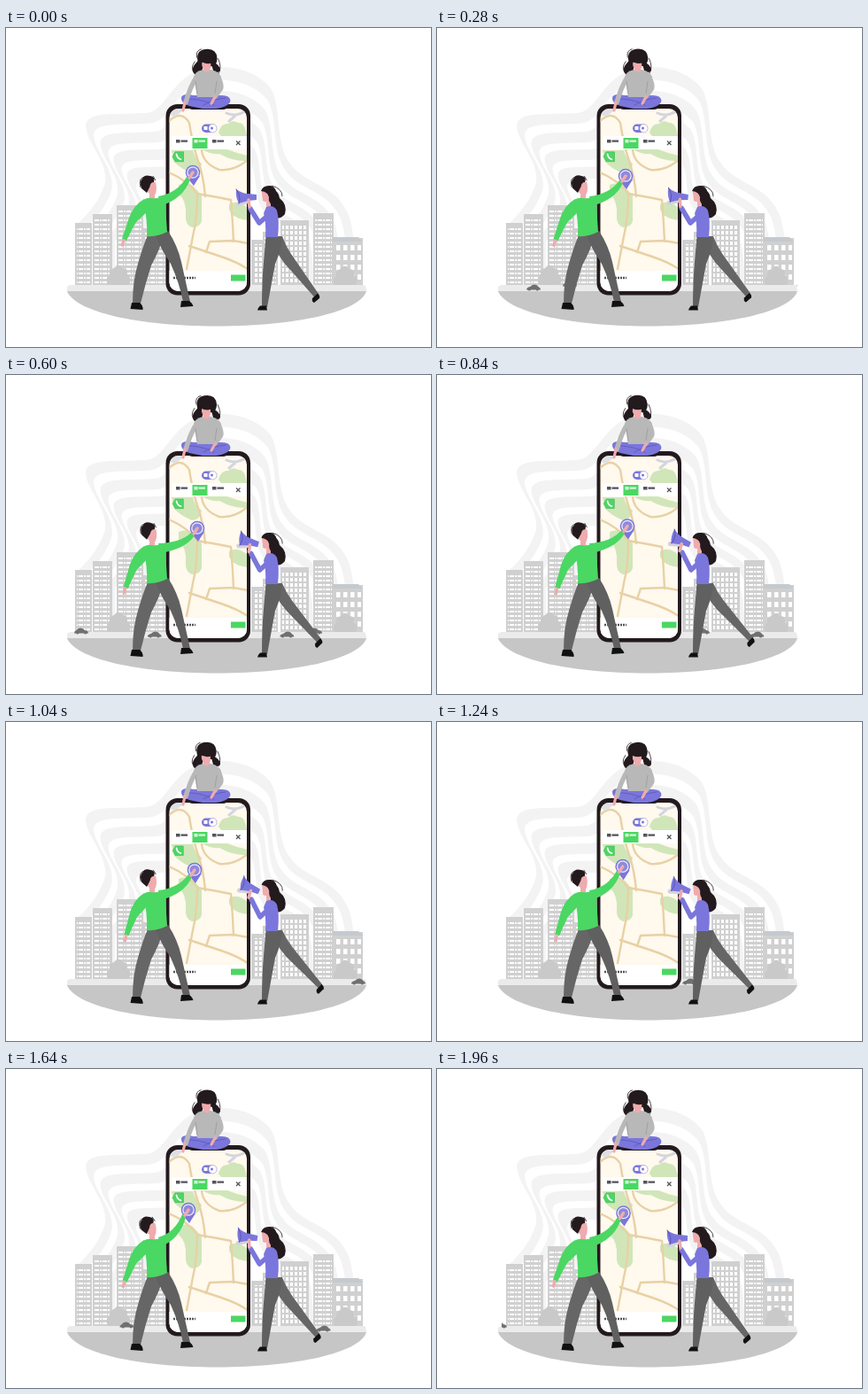
These frames come from a looping animation (480 by 360 pixels, 2 s). An HTML page:

```html
<!DOCTYPE html>
<html lang="en">
<head>
<meta charset="utf-8">
<title>City map app</title>
<style>
html, body { margin: 0; width: 100%; height: 100%; overflow: hidden; background: #fff }
svg { display: block; width: 480px; height: 360px }
.line { fill: none; stroke-linecap: round; stroke-linejoin: round }
.hair { fill: #231a1e }
.skin { fill: #efabad }
.green { fill: #4bd763 }
.violet { fill: #7a76dc }
.wire { fill: none; stroke: #231a1e; stroke-width: .8 }
</style>
</head>
<body>
<svg viewBox="0 0 480 360">
<defs>
  <pattern id="rows" width="9" height="5" patternUnits="userSpaceOnUse">
    <path d="M1 1h5v2h-5zM7 1h2v2h-2z" fill="#fff"/>
  </pattern>
  <pattern id="grid" width="5" height="6" patternUnits="userSpaceOnUse">
    <path d="M1 1h3v4h-3z" fill="#fff"/>
  </pattern>
  <pattern id="panes" x="371" y="244" width="8" height="11" patternUnits="userSpaceOnUse">
    <path d="M2 1h4.500v6h-4.500z" fill="#fff"/>
  </pattern>
  <clipPath id="road"><path d="M73 280H407V300H73z"/></clipPath>
  <clipPath id="screen"><rect x="184.500" y="91" width="87.500" height="206" rx="10"/></clipPath>
  <path id="car" d="M-8 2.500Q-8-.5-4-1Q-2-3.500 1-3.500Q4-3.500 6-.5Q8 0 8 2.500H6A2 2 0 0 1 2.500 2.500H-3A2 2 0 0 1 -6.500 2.500z" fill="#707070"/>
  <path id="bush" d="M-12 12Q-15 4-10 1Q-11-6-5-7Q0-14 5-7Q11-7 10 0Q16 4 12 12z" fill="#c9c9c9"/>
</defs>

<g id="waves"></g>
<g id="city"></g>
<use href="#bush" x="127" y="278"/>
<use href="#bush" x="383" y="279"/>
<path d="M72 290H404Q407 290 407 298H69V292z" fill="#ebebeb"/>
<path d="M69 297H407C400 320 328 336.500 238 336.500S78 320 69 297z" fill="#c6c6c6"/>
<g clip-path="url(#road)" id="cars"></g>

<!-- phone -->
<rect x="180.500" y="86" width="95.500" height="215.500" rx="13" class="hair"/>
<g clip-path="url(#screen)">
  <path d="M184 90h89v207h-89z" fill="#fff9ee"/>
  <g fill="#d0e6b9">
    <path d="M240 118Q243 107 251 108Q256 103 262 107Q270 106 272 122H243z"/>
    <path d="M187 138H211Q213 147 221 153Q220 163 210 164Q196 158 190 151z"/>
    <path d="M222 137H250Q262 142 273 144V150Q257 151 241 142Q230 143 222 137z"/>
    <path d="M195 177Q205 173 211 178L221 189V218Q219 225 210 225Q202 222 203 211Q204 195 195 187z"/>
    <path d="M252 199Q261 193 273 203V217Q256 215 252 205z"/>
  </g>
  <g class="line" stroke="#e8d1a4" stroke-width="2.400">
    <path d="M184 105Q198 92 207 107Q211 133 217 150T225 190"/>
    <path d="M221 137Q222 153 241 160Q257 162 273 149"/>
    <path d="M184 163Q205 172 216 187Q240 191 254 194Q256 216 257 241"/>
    <path d="M216 188Q216 215 211 235L204 272"/>
    <path d="M207 246Q225 252 243 258T273 272M226 253L230 241L257 240L273 243"/>
  </g>
  <path d="M249 96Q259 101 272 93M259 99L252 105" class="line" stroke="#d4d5df" stroke-width="3"/>
  <path d="M187 122h86v15h-86zM184 274h89v24h-89z" fill="#fff"/>
  <path d="M184 90Q186 105 195 97L202 91z" fill="#dfe0e5"/>
</g>
<path d="M206 86h44v2q0 4-5 4h-34q-5 0-5-4z" class="hair"/>
<rect x="221" y="108.500" width="17" height="9.500" rx="4.700" class="violet"/>
<rect x="229" y="108.500" width="9" height="9.500" rx="4.500" fill="#fff" stroke="#aaa8d9" stroke-width=".7"/>
<path d="M223.500 111h4v4h-4z" fill="#fff"/>
<circle cx="232.500" cy="113" r="1.500" class="violet"/>
<path d="M210.500 124h17v12h-17zM254 278.500h16.500v7h-16.500z" class="green"/>
<g fill="#55525a">
  <path d="M192 126h4.500v3.500h-4.500zM197.500 126.500h7.500v2.300h-7.500zM233 126h4.500v3.500h-4.500zM238.500 126.500h7.500v2.300h-7.500z"/>
  <path d="M212.500 126h4v3.500h-4zM217.500 126.500h7.500v2.300h-7.500z" fill="#d9f5d9"/>
</g>
<g class="line" stroke="#55525a" style="stroke-linecap:butt">
  <path d="M189 282h25" stroke-width="2.500" stroke-dasharray="2 1"/>
  <path d="M260 127.500l4.500 4.500m0-4.500l-4.500 4.500" stroke-width="1.300"/>
</g>
<g id="call">
  <path d="M-6.500 0L-3.500-5.500H6V5.500H-3.500z" class="green" stroke="#47b761" stroke-width=".7"/>
  <path d="M-2-3Q-1 2 3 3" class="line" stroke="#fff" stroke-width="1.800"/>
</g>

<!-- seated girl -->
<path d="M212 76Q200 73 198 78Q197 85 207 88L222 91H237Q252 89 253.500 82Q253 76 244 76z" class="violet"/>
<path d="M202 80Q219 79 235 87M248 79Q235 80 223 87" class="line" stroke="#5d57b5" stroke-width=".8"/>
<path d="M217 37Q207 46 213 52H220L224 40zM231 37Q243 42 242 48Q239 52 234 48z" class="hair"/>
<path d="M223 47Q213 49 212 55L216 78H239L243 55Q240 49 231 47z" fill="#b8b8b8"/>
<path d="M223 42h7v6q-3 3-7 0z" class="skin"/>
<g class="line" stroke="#b8b8b8" stroke-width="5.500">
  <path d="M216 54Q208 66 203 84"/>
  <path d="M239 54Q245 66 242 69L236 77"/>
</g>
<path d="M202 84L200 93M236 78L232 85" class="line" stroke="#efabad" stroke-width="3.200"/>
<path d="M214 60L216 75M238 60L236 74" stroke="#969696" stroke-width=".7"/>
<g id="girl">
  <path d="M217 40Q212 25 224 23Q237 21 238 33Q238 40 233 42H220z" class="hair"/>
  <path d="M221 38H231V43Q230 47 226.500 47Q222 46 221 41z" class="skin"/>
  <path d="M219 36Q225 41 233 38V31H219z" class="hair"/>
  <path d="M213 37Q207 46 214 51M239 33Q244 43 240 50M215 33Q213 25 220 23" class="wire"/>
</g>

<!-- man -->
<path d="M160 234H178Q174 250 164 268Q157 290 152 311H143Q143 285 149 266Q154 248 160 234z" fill="#666"/>
<path d="M169 234L183 229Q194 246 198 264L208 309H200Q196 288 186 266Q175 250 169 234z" fill="#606060"/>
<path d="M142 310h9q4 3 3.500 8l-14-1zM198 308h9q4 3 4.500 6l-14.500 1z" fill="#111"/>
<g id="leftArm">
  <path d="M156 193Q144 200 139 214L131 238L136 240Q142 228 147 219L161 206z" class="green"/>
  <path d="M133 240L131.500 245" class="line" stroke="#efabad" stroke-width="3.500"/>
</g>
<path d="M162 183h6v9q-3 4-6 1z" class="skin"/>
<path d="M155 194Q160 191 164 192Q172 193 176 190Q181 192 180 200L182 230Q171 236 159 235Q160 217 155 194z" class="green"/>
<g id="manHead">
  <path d="M160 174H169Q171 182 168.500 188Q164 190 160 185z" class="skin"/>
  <path d="M153 181Q150 173 154 170Q156 165 163 167Q169 168 167 174Q163 174 162.500 179L159 186z" class="hair"/>
  <path d="M152 180Q149 169 157 168M166 167L169 172" class="wire"/>
</g>
<g id="pin">
  <path d="M-7 5Q-3 10 1 15Q4 10 8 4z" class="violet"/>
  <circle r="8.300" class="violet"/>
  <circle r="6.200" fill="#8e89dc" stroke="#eeedf9" stroke-width="1.300"/>
</g>
<path id="sleeve" class="green"/>
<path id="hand" class="line" stroke="#efabad" stroke-width="3.500"/>

<!-- woman -->
<g id="backLeg">
  <path d="M299 236L312 235Q316 246 322 255L353 300L348.500 304L322 274Q306 258 299 236z" fill="#666"/>
  <path d="M346 305L352 299.500Q355 302 354 305L348 310Q345 309 346 305z" fill="#111"/>
</g>
<path d="M293.500 235H312Q311 251 304 266L295 315H289Q289 285 291 264z" fill="#606060"/>
<path d="M287 313.500h7l1 5h-11q0-2 3-5z" fill="#111"/>
<path d="M299 184Q307 181 309 192Q318 199 315 210Q308 218 302 212Q296 204 299 184z" class="hair"/>
<path d="M294 193h5v10h-5z" class="skin"/>
<path d="M294 202Q302 199 306 206Q309 217 307 236H293Q294 220 291 209z" class="violet"/>
<g id="womanHead">
  <path d="M288.500 183H298V193Q294 198 290 195z" class="skin"/>
  <path d="M288 184Q290 177 299 178Q306 180 306 190Q307 199 301 201Q296 196 297 191Q296 185 288 184z" class="hair"/>
  <path d="M300 178Q312 181 312 190M309 194Q318 202 313 211" class="wire"/>
</g>
<path id="womanArm" class="line" stroke="#7a76dc" stroke-width="5.500"/>
<g id="horn">
  <path d="M262 199L271 196" class="line" stroke="#d3d3db" stroke-width="5"/>
  <path d="M260 182Q267 187 274 187L283 188V194L273 195L263 198Q259 191 260 182z" class="violet"/>
  <path d="M260 182Q266 190 263 198" class="line" stroke="#5d57b5" stroke-width="1"/>
  <path d="M274 194L275 202" class="line" stroke="#efabad" stroke-width="3.500"/>
</g>
</svg>
<script>
const el = id => document.getElementById(id);
const set = (id, name, value) => el(id).setAttribute(name, value);
const move = (id, value) => set(id, "transform", value);
const LOOP = 2000;

// Alternating contours around the base of the phone
const contour = "M80 290V222Q106 198 112 174C115 150 91 130 90 110C91 94 121 98 157 96C181 95 184 60 219 47C246 40 280 45 299 68C312 90 303 130 321 153C335 175 369 176 384 205Q394 220 396 290Z";
el("waves").innerHTML = [1, .94, .89, .83, .79, .73, .69, .62].map((s, i) =>
  `<path d="${contour}" fill="${i % 2 ? "#fff" : "#f3f3f3"}" transform="translate(240 290) scale(${s}) translate(-240 -290)"/>`).join("");

const towers = [
  [78, 220, 19, "rows"], [98, 210, 22, "rows"], [125, 200, 30, "rows"],
  [155, 226, 27, "rows"], [277, 239, 16, "grid"], [290, 230, 17, "rows"],
  [310, 217, 32, "grid"], [347, 209, 23, "rows"], [369, 237, 34, "panes"]
];
el("city").innerHTML = towers.map(([x, y, w, fill]) =>
  `<path d="M${x} ${y}h${w}V290h${-w}z" fill="#d0d0d0"/>
   <path d="M${x + 2} ${y + 5}h${w - 4}V288h${4 - w}z" fill="url(#${fill})"/>`).join("") +
  '<path d="M369 236h29l5 5h-34z" fill="#c5cacf"/>';

// start x, speed per ms, y
const cars = [[57.5, .1835, 293], [207, .1835, 293], [207, -.203, 289], [472, -.2045, 289]];
el("cars").innerHTML = cars.map((c, i) => `<use id="car${i}" href="#car"/>`).join("");

// Periodic smooth curve through key values
const times = [0, 280, 600, 1040, 1520, 1640];
function curve(values, t) {
  const n = times.length;
  const key = i => {
    const k = (i + n) % n;
    return [times[k] + LOOP * Math.floor(i / n), values[k]];
  };
  const slope = i => {
    const [a, p] = key(i - 1), [b, q] = key(i + 1);
    return (q - p) / (b - a);
  };
  let i = n - 1;
  while (times[i] > t) i--;
  const [a, p] = key(i), [b, q] = key(i + 1), d = b - a, u = (t - a) / d, v = 1 - u;
  return v * v * ((1 + 2 * u) * p + u * d * slope(i)) + u * u * ((3 - 2 * u) * q - v * d * slope(i + 1));
}

function draw(now) {
  const t = now % LOOP;
  const q = (1 - Math.cos(2 * Math.PI * t / LOOP)) / 2;
  cars.forEach(([x, speed, y], i) =>
    move("car" + i, `translate(${x + speed * t} ${y}) scale(${Math.sign(speed)} 1)`));

  const x = curve([211, 213, 216, 213, 205, 206], t);
  const y = curve([163, 167, 173, 167, 158, 159], t);
  const elbowX = 196 + (x - 211) * .6, elbowY = 188 + (y - 163) * .35;
  move("pin", `translate(${x} ${y})`);
  set("sleeve", "d", `M172 190Q${elbowX - 2} ${elbowY - 2} ${x - 7} ${y + 5}L${x - 3} ${y + 8}Q${elbowX + 4} ${elbowY + 5} 174 201z`);
  set("hand", "d", `M${x - 4} ${y + 6}L${x} ${y}`);
  move("leftArm", `rotate(${-3.5 * q} 159 199)`);
  move("manHead", `rotate(${(x - 211) * .5} 163 188)`);

  move("girl", `translate(0 ${1 - q}) rotate(${2 - 3 * q} 227 48)`);
  move("call", `translate(194.500 145.300) scale(${1 - .04 * q})`);

  move("backLeg", `rotate(${-4.2 * q} 306 238)`);
  move("womanHead", `rotate(${2 * q} 296 200)`);
  move("horn", `translate(${q} ${-3 * q}) rotate(${25 * q} 276 197)`);
  set("womanArm", "d", `M301 207L${286 + q} 220L${276 + q} ${204 - 4 * q}`);
}

const start = performance.now();
(function tick() {
  draw(performance.now() - start);
  requestAnimationFrame(tick);
})();
</script>
</body>
</html>
```
